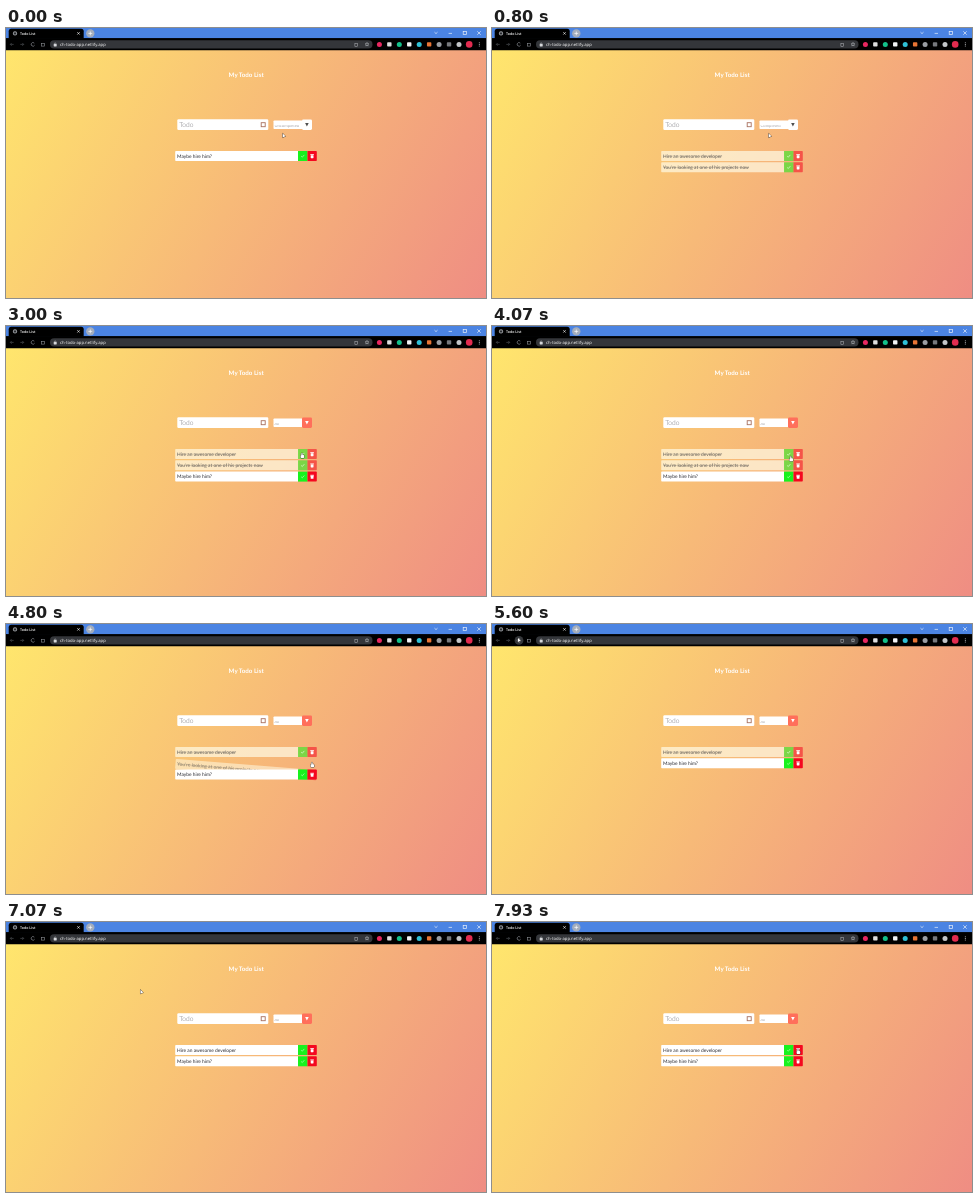
These frames come from a looping animation (480 px wide and 270 px high, 8 s). An HTML page with a canvas:

```html
<!DOCTYPE html>
<html lang="en">
<head>
<meta charset="utf-8">
<title>Todo List</title>
<style>
  html, body { margin: 0; width: 100%; height: 100%; overflow: hidden; background: #000; }
  canvas { display: block; width: 480px; height: 270px; }
</style>
</head>
<body>
<canvas id="stage" width="480" height="270"></canvas>
<script>
const ctx = document.getElementById('stage').getContext('2d');
const LOOP = 8000;
const UI = '"Open Sans", sans-serif';
const PAGE = 'Lato, sans-serif';

const COMPLETED_AT = 800, ALL_AT = 2200, BLUR_AT = 2330;
const FALL = { start: 4715, duration: 500 };
const RELOAD = { click: 6100, clear: 6200, list: 6800, done: 6900 };

const clamp = v => Math.max(0, Math.min(1, v));
const smooth = v => v * v * (3 - 2 * v);
const progress = (t, start, duration) => clamp((t - start) / duration);
const lerp = (a, b, p) => a + (b - a) * p;

// CSS "ease" curve, solved by bisection
function ease(x) {
  const bezier = (a, b, u) => 3 * a * u * (1 - u) ** 2 + 3 * b * u * u * (1 - u) + u ** 3;
  let lo = 0, hi = 1;
  for (let i = 0; i < 16; i++) {
    const mid = (lo + hi) / 2;
    if (bezier(.25, .25, mid) < x) lo = mid; else hi = mid;
  }
  return bezier(.1, 1, lo);
}

// ---- drawing helpers ----

function rect(x, y, w, h, fill, r = 0) {
  ctx.fillStyle = fill;
  ctx.beginPath();
  ctx.roundRect(x, y, w, h, r);
  ctx.fill();
}

function disc(x, y, r, fill) {
  ctx.fillStyle = fill;
  ctx.beginPath();
  ctx.arc(x, y, r, 0, 7);
  ctx.fill();
}

function arc(x, y, r, from, to, color, width = .7) {
  ctx.strokeStyle = color;
  ctx.lineWidth = width;
  ctx.beginPath();
  ctx.arc(x, y, r, from, to);
  ctx.stroke();
}

function line(points, color, width = .7) {
  ctx.strokeStyle = color;
  ctx.lineWidth = width;
  ctx.beginPath();
  points.forEach(([x, y]) => ctx.lineTo(x, y));
  ctx.stroke();
}

function box(x, y, r, color, width = .7) {
  ctx.strokeStyle = color;
  ctx.lineWidth = width;
  ctx.strokeRect(x - r, y - r, 2 * r, 2 * r);
}

const dash = (x, y, r, color) => line([[x - r, y], [x + r, y]], color);

function cross(x, y, r, color) {
  line([[x - r, y - r], [x + r, y + r]], color);
  line([[x - r, y + r], [x + r, y - r]], color);
}

function arrow(x, y, dir, color) {
  dash(x, y, 1.7, color);
  const tip = x + 1.7 * dir, back = tip - 1.4 * dir;
  line([[back, y - 1.4], [tip, y], [back, y + 1.4]], color);
}

function star(x, y, r, color) {
  const point = i => {
    const a = i * Math.PI / 5 - Math.PI / 2, d = i % 2 ? r * .45 : r;
    return [x + d * Math.cos(a), y + d * Math.sin(a)];
  };
  line(Array.from({ length: 11 }, (_, i) => point(i)), color, .5);
}

function text(str, x, y, size, family, fill, weight = 400) {
  ctx.font = `${weight} ${size}px ${family}`;
  ctx.fillStyle = fill;
  ctx.fillText(str, x, y);
  return ctx.measureText(str).width;
}

// ---- browser window ----

function drawTabs(t, loading) {
  const mid = 5.4;
  rect(0, 0, 480, 10.3, '#4b84e3');
  rect(2.7, .8, 75, 10, '#000', [2.5, 2.5, 0, 0]);
  if (loading) {
    arc(9.5, mid, 2, t / 140, t / 140 + 2.2, '#5b6f92', .8);
  } else {
    disc(9, mid, 2.1, '#a2a5aa');
    disc(9, mid, 1.2, '#292b2e');
  }
  text('Todo List', 14, 6.8, 3.6, UI, '#fff', 600);
  cross(72.5, mid, 1.2, '#eee');

  disc(84.3, mid, 4.2, '#a3adbd');
  dash(84.3, mid, 1.9, '#fff');
  line([[84.3, mid - 1.9], [84.3, mid + 1.9]], '#fff');

  const control = '#e9effa';
  line([[428.5, 4.2], [430, 5.6], [431.5, 4.2]], control);
  dash(444.3, mid, 1.7, control);
  box(458.8, 5, 1.6, control);
  cross(473, 5, 1.7, control);
}

function drawExtensions() {
  const colors = ['#e72760', '#dedede', '#13c08a', '#f2f4f6', '#2fc0d6', '#e87535', '#9b9ea3', '#77797d', '#c4c6c9'];
  colors.forEach((color, i) => {
    const x = 373.4 + i * 9.95;
    if (i % 2) rect(x - 2.2, 14.2, 4.4, 4.4, color, .8);
    else disc(x, 16.4, 2.5, color);
  });
  disc(463.2, 16.4, 3.3, '#e32c50');
  for (let i = -1; i < 2; i++) disc(473.3, 16.4 + i * 1.6, .5, '#c8cacd');
}

function drawToolbar(t, loading) {
  const mid = 16.4, dim = '#4b4e52', lit = '#8d9095';
  rect(0, 10.3, 480, 11.9, '#000');
  arrow(6, mid, -1, dim);
  arrow(16, mid, 1, dim);
  if (t > 5420 && t < 6600) disc(27, mid, 4.4, '#35373a');
  if (loading) cross(27, mid, 1.4, lit);
  else arc(27, mid, 1.8, .5, 5.5, lit);
  box(37, mid + .3, 1.4, lit, .6);

  rect(44, 12.3, 322.5, 8.3, '#34363a', 4.1);
  rect(47.7, 16, 3, 2.4, '#d6d8db', .4);
  arc(49.2, 16, 1, Math.PI, 0, '#d6d8db', .5);
  text('ch-todo-app.netlify.app', 54, 18, 4.23, UI, '#fff');
  box(350.3, 17, 1.4, '#b9bcc0', .5);
  star(361, mid, 2, '#c5c8cc');
  drawExtensions();
}

// ---- page ----

function drawBackground() {
  const angle = Math.PI * 2 / 3, half = 270;
  const dx = half * Math.sin(angle), dy = -half * Math.cos(angle);
  const gradient = ctx.createLinearGradient(240 - dx, 146 - dy, 240 + dx, 146 + dy);
  gradient.addColorStop(0, '#ffe66d');
  gradient.addColorStop(1, '#ef8d83');
  ctx.fillStyle = gradient;
  ctx.fillRect(0, 22, 480, 248);
}

function drawForm(t) {
  text('My Todo List', 222.6, 49.4, 6.2, PAGE, '#fff', 700);

  rect(171.3, 91.3, 91, 10.7, '#fff', 1.2);
  text('Todo', 173.2, 99, 6.7, PAGE, '#74747a', 300);
  box(257.2, 96.7, 2, '#a9705f', .9);

  rect(267.5, 92.5, 29, 8.6, '#fff', .8);
  const choice = t < COMPLETED_AT ? 'Uncompleted' : t < ALL_AT ? 'Completed' : 'All';
  ctx.save();
  ctx.beginPath();
  ctx.rect(268, 97.2, 28, 3.4);
  ctx.clip();
  text(choice, 268.5, 99.4, 4.2, PAGE, '#a4a4a8');
  ctx.restore();

  const p = ease(progress(t, BLUR_AT, 300));
  const icon = lerp(80, 255, p);
  rect(296, 91.5, 10, 10.4, `rgb(255,${lerp(255, 111, p)},${lerp(255, 91, p)})`, 1.3);
  ctx.fillStyle = `rgb(${icon},${icon},${icon})`;
  ctx.beginPath();
  ctx.moveTo(299.1, 95);
  ctx.lineTo(302.7, 95);
  ctx.lineTo(300.9, 98.4);
  ctx.fill();
}

const rowY = index => 123 + index * 11.3;

function drawTask({ label, done, fall = 0 }, index) {
  const y = rowY(index), mid = y + 5;
  const fade = 1 - fall;
  ctx.save();
  ctx.translate(240, mid + 27 * fall);
  ctx.rotate(fall * Math.PI / 9);
  ctx.translate(-240, -mid);

  ctx.globalAlpha = (done ? .7 : 1) * fade;
  rect(169.2, y, 123, 10, done ? '#fffbe6' : '#fff', [.8, 0, 0, .8]);
  const width = text(label, 171, y + 6.5, 4.85, PAGE, '#292a31');
  if (done) line([[171, mid + .1], [171 + width, mid + .1]], '#292a31', .25);

  ctx.globalAlpha = (done ? .55 : 1) * fade;
  rect(292, y, 9.5, 10, '#18f21e');
  rect(301.5, y, 9.3, 10, '#f4081f', [0, .8, .8, 0]);

  ctx.globalAlpha = fade;
  line([[295.2, mid + .2], [296.3, mid + 1.2], [298.3, mid - 1.1]], done ? '#e4ffd8' : '#b5ffb6');
  rect(304.3, mid - 1.8, 3.6, .9, '#fff');
  rect(304.7, mid - .8, 2.8, 3, '#fff', .4);
  ctx.restore();
}

function visibleTasks(t) {
  const reloaded = t >= RELOAD.list;
  const hire = { label: 'Hire an awesome developer', done: !reloaded };
  const look = { label: "You're looking at one of his projects now", done: true };
  const maybe = { label: 'Maybe hire him?', done: false };
  if (t < COMPLETED_AT) return [maybe];
  if (t < ALL_AT) return [hire, look];
  if (t < FALL.start + FALL.duration) {
    look.fall = ease(progress(t, FALL.start, FALL.duration));
    return [hire, look, maybe];
  }
  return t >= RELOAD.clear && !reloaded ? [] : [hire, maybe];
}

// ---- pointer ----

const option = i => ({ x: 276.7, y: 102.5 + 3 * i });
const check = i => ({ x: 296, y: rowY(i) + 4 });
const trash = i => ({ x: 306, y: rowY(i) + 4 });

const MOVES = [
  { at: 250, time: 250, to: { x: 276, y: 98 } },
  { at: 550, time: 250, to: option(1) },
  { at: 1100, time: 450, to: option(0) },
  { at: 2300, time: 360, to: check(0) },
  { at: 3930, time: 400, to: trash(1) },
  { at: 4870, time: 580, to: { x: 26, y: 14 } },
  { at: 6080, time: 400, to: { x: 58.5, y: 41.5 } },
  { at: 6850, time: 600, to: trash(0) }
];

function pointerAt(t) {
  return MOVES.reduce((from, { at, time, to }) => {
    const p = smooth(progress(t, at, time));
    return { x: lerp(from.x, to.x, p), y: lerp(from.y, to.y, p) };
  }, option(1));
}

function drawPointer(t) {
  const { x, y } = pointerAt(t);
  const overButton = y > rowY(0) && x > 292;
  ctx.save();
  ctx.translate(x, y);
  ctx.beginPath();
  if (overButton) {
    ctx.roundRect(-.6, 0, 1.2, 3, .5);
    ctx.roundRect(-1.4, 2, 3.6, 3, .8);
  } else {
    ctx.moveTo(0, 0);
    ctx.lineTo(0, 4);
    ctx.lineTo(1.3, 3.3);
    ctx.lineTo(2.8, 2.8);
    ctx.closePath();
  }
  ctx.lineWidth = .8;
  ctx.strokeStyle = '#34302e';
  ctx.stroke();
  ctx.fillStyle = '#fff';
  ctx.fill();
  ctx.restore();
}

function draw(t) {
  const loading = t >= RELOAD.click && t < RELOAD.done;
  drawBackground();
  drawForm(t);
  visibleTasks(t).forEach(drawTask);
  drawTabs(t, loading);
  drawToolbar(t, loading);
  drawPointer(t);
}

ctx.textRendering = 'geometricPrecision';
const started = performance.now();
function tick() {
  draw((performance.now() - started) % LOOP);
  requestAnimationFrame(tick);
}
tick();
</script>
</body>
</html>
```
